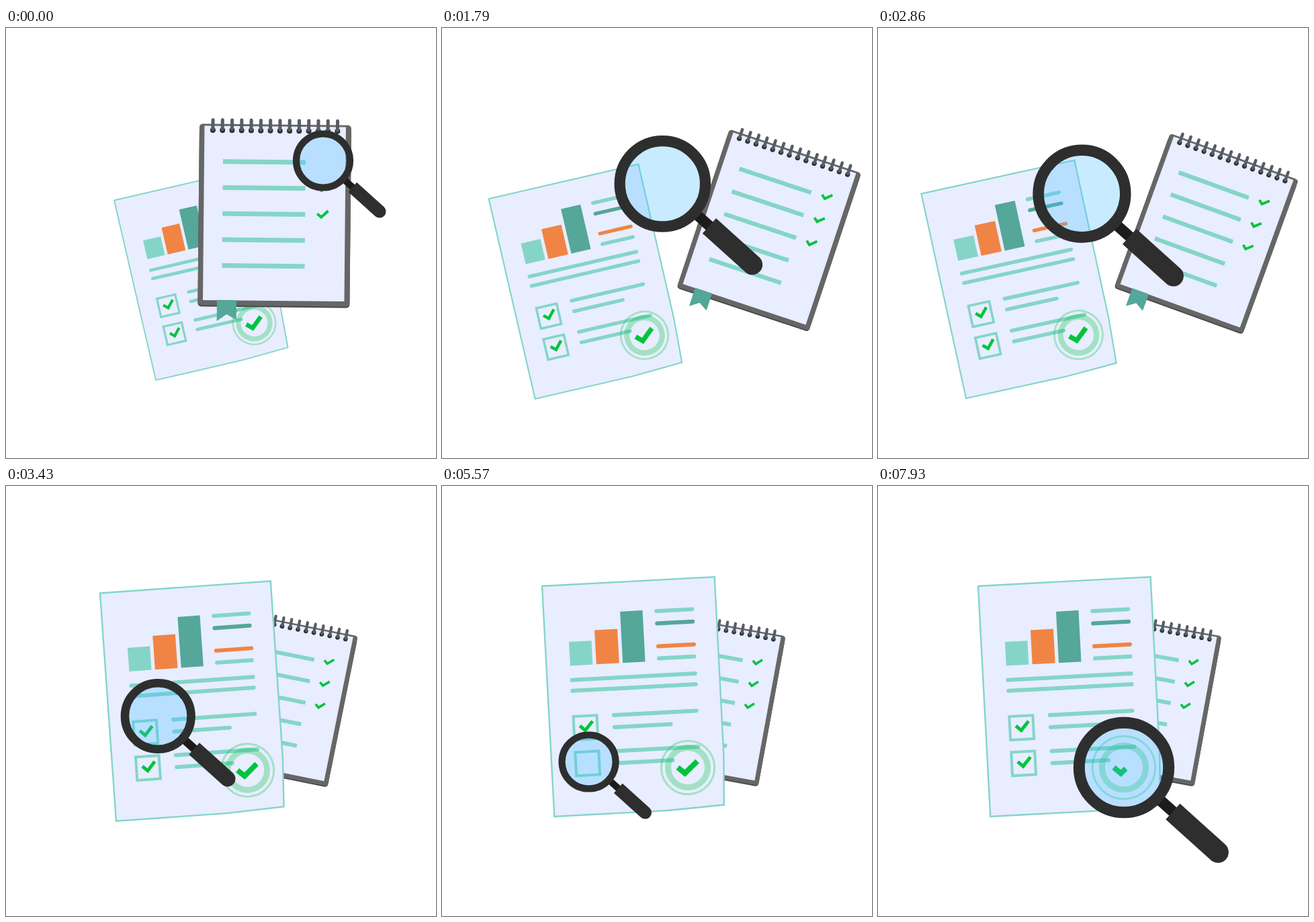
These frames come from a looping animation (640x640 px, 8000 ms). An HTML page:

```html
<!DOCTYPE html>
<html lang="en">
<head>
<meta charset="utf-8">
<title>Checklist review</title>
<style>
  html, body { margin: 0; width: 100%; height: 100%; overflow: hidden; background: #fff; }
  svg { display: block; width: 100%; height: 100%; }
  .teal { fill: #84d5c8; } .dark { fill: #54a799; } .orange { fill: #f08444; }
  .line { fill: none; stroke: #84d5c8; stroke-width: 6; stroke-linecap: round; }
  .box { fill: none; stroke: #84d5c8; stroke-width: 4; }
  .check { fill: none; stroke: #00c43e; stroke-width: 5; }
  .ring { fill: none; stroke: #00c43e; stroke-opacity: .3; }
</style>
</head>
<body>
<svg viewBox="0 0 640 640">
  <g id="paper">
    <path d="M0 0H257L256.5 265L253 339.5L169 343.5H0Z" fill="#e8edff" stroke="#84d5c8" stroke-width="2.4"/>
    <rect class="teal" x="35.5" y="85" width="33.5" height="35.5"/>
    <rect class="orange" x="74.4" y="69.5" width="34" height="51"/>
    <rect class="dark" x="113.8" y="44" width="33.5" height="76.5"/>
    <path class="line" d="M168 46.2H221M168 116.6H220.5M37 142H220.5M37 158H220.5"/>
    <path class="line" style="stroke:#54a799" d="M168 64.5H221"/>
    <path class="line" style="stroke:#f08444" d="M168 98.6H221"/>
    <path class="line" d="M96.5 197.4H219.3M96.5 215.4H180.2M96.5 251H219.3M96.5 269H180.2"/>
    <rect class="box" x="36" y="196.3" width="35" height="35"/>
    <rect class="box" x="36" y="249.6" width="35" height="35"/>
    <path class="check" id="boxCheck1" pathLength="1" d="M45 210.7L52.7 217.8L64.2 204.7"/>
    <path class="check" id="boxCheck2" pathLength="1" d="M45 264.2L52.7 271.3L64.2 258.2"/>
    <circle class="ring" id="outerRing" cx="202.3" cy="281.2" stroke-width="3"/>
    <circle class="ring" id="innerRing" cx="202.3" cy="281.2" stroke-width="9"/>
    <path class="check" id="sealCheck" pathLength="1" style="stroke-width:8" d="M187.3 280.3L197.4 289.5L216.8 272.5"/>
  </g>
  <g id="notebook">
    <rect y="6" width="226" height="266" rx="5" fill="#4a4a4a"/>
    <rect width="226" height="270" rx="5" fill="#666"/>
    <rect x="7.5" y="3" width="210.5" height="259.5" fill="#e8edff"/>
    <path class="dark" d="M28.5 262H57.5V291.5L43 283L28.5 293.5Z"/>
    <g id="spiral"></g>
    <path fill="none" stroke="#84d5c8" stroke-width="7" d="M35.5 56h123m-123 38.7h123m-123 38.7h123m-123 38.7h123m-123 38.6h123"/>
    <g class="check" style="stroke-width:4.2">
      <path id="noteCheck" pathLength="1" d="M176.5 53.3l6.1 5l10.2 -9.4"/>
      <path d="M176.5 92.8l6.1 5l10.2 -9.4M176.5 132.3l6.1 5l10.2 -9.4"/>
    </g>
  </g>
  <g id="lens">
    <g transform="rotate(42)">
      <path d="M42 0H62" stroke="#1c1c1c" stroke-width="10"/>
      <path d="M58.8 -9.5H113a9.5 9.5 0 0 1 0 19H58.8Z" fill="#2e2e2e"/>
    </g>
    <circle r="36" fill="#4bbcff" fill-opacity=".3"/>
    <circle r="40" fill="none" stroke="#2e2e2e" stroke-width="10.2"/>
  </g>
</svg>
<script>
const LOOP = 8000, DRAW_TIME = 900;
const el = id => document.getElementById(id);
const clamp = u => Math.min(1, Math.max(0, u));
const smooth = u => u * u * (3 - 2 * u);
const easeInOut = u => u < .5 ? 8 * u ** 4 : 1 - 8 * (1 - u) ** 4;
const progress = (t, start, end) => easeInOut(clamp((t - start) / (end - start)));

const APART = [680, 2375], SWAP = [2376, 3960];

// Each move is [start, end, values]; moves add up from the first pose.
function pose(t, first, moves) {
  let from = first, now = first;
  for (const [start, end, to] of moves) {
    const p = progress(t, start, end), base = from;
    now = now.map((v, i) => v + (to[i] - base[i]) * p);
    from = to;
  }
  return now;
}

el('spiral').innerHTML = Array.from({ length: 14 }, (_, i) => {
  const x = 20 + 14.27 * i;
  return `<circle cx="${x}" cy="9.3" r="4" fill="#2e2e2e"/>` +
    `<path d="M${x} -6V8" stroke="#565d66" stroke-width="5" stroke-linecap="round"/>`;
}).join('');

// A check is complete until its turn, then vanishes and is drawn again.
function drawCheck(id, t, start) {
  const p = t < start ? 1 : smooth(clamp((t - start) / DRAW_TIME));
  el(id).setAttribute('stroke-dasharray', p === 1 ? 'none' : `${p} 2`);
  el(id).style.visibility = p < .03 ? 'hidden' : 'visible';
}

let paperInFront = null;
function setOrder(front) {
  if (front === paperInFront) return;
  paperInFront = front;
  el('lens').before(el(front ? 'paper' : 'notebook'));
}

function render(t) {
  setOrder(t > SWAP[0]);

  const [px, py, ps, pa] = pose(t, [161, 256.5, .8, -13.05], [
    [...APART, [58, 254, .901, -13.05]],
    [...SWAP, [149, 149, 1, -3.05]]
  ]);
  el('paper').setAttribute('transform', `translate(${px} ${py}) rotate(${pa}) scale(${ps})`);

  const [nx, ny, ns, na] = pose(t, [399.7, 278.1, 1, .55], [
    [...APART, [496, 304.3, .905, 20.66]],
    [...SWAP, [398.2, 317.2, .837, 10.4]]
  ]);
  const p = progress(t, ...APART), arc = 4 * p * (1 - p);
  el('notebook').setAttribute('transform',
    `translate(${nx + 5 * arc} ${ny - 3 * arc}) rotate(${na}) scale(${ns}) translate(-113 -134.5)`);

  const [lx, ly] = pose(t, [472, 197.5], [
    [...APART, [310, 238.5]],
    [...SWAP, [217, 354]],
    [4640, 5640, [218.5, 410.5]],
    [6470, 7770, [366, 419]]
  ]);
  const [size] = pose(t, [1], [
    [...APART, [1.667]],
    [2125, 4530, [1]],
    [6470, 7770, [1.667]]
  ]);
  el('lens').setAttribute('transform', `translate(${lx} ${ly - 5 * arc}) scale(${size})`);

  drawCheck('noteCheck', t, 0);
  drawCheck('boxCheck1', t, 3850);
  drawCheck('boxCheck2', t, 5540);
  drawCheck('sealCheck', t, 7420);

  const pulse = smooth(clamp((t - 7420) / 510));
  el('outerRing').setAttribute('r', 39.7 + 7 * pulse);
  el('innerRing').setAttribute('r', 29.5 + 3.2 * pulse);
}

function frame() {
  render(performance.now() % LOOP);
  requestAnimationFrame(frame);
}
frame();
</script>
</body>
</html>
```
